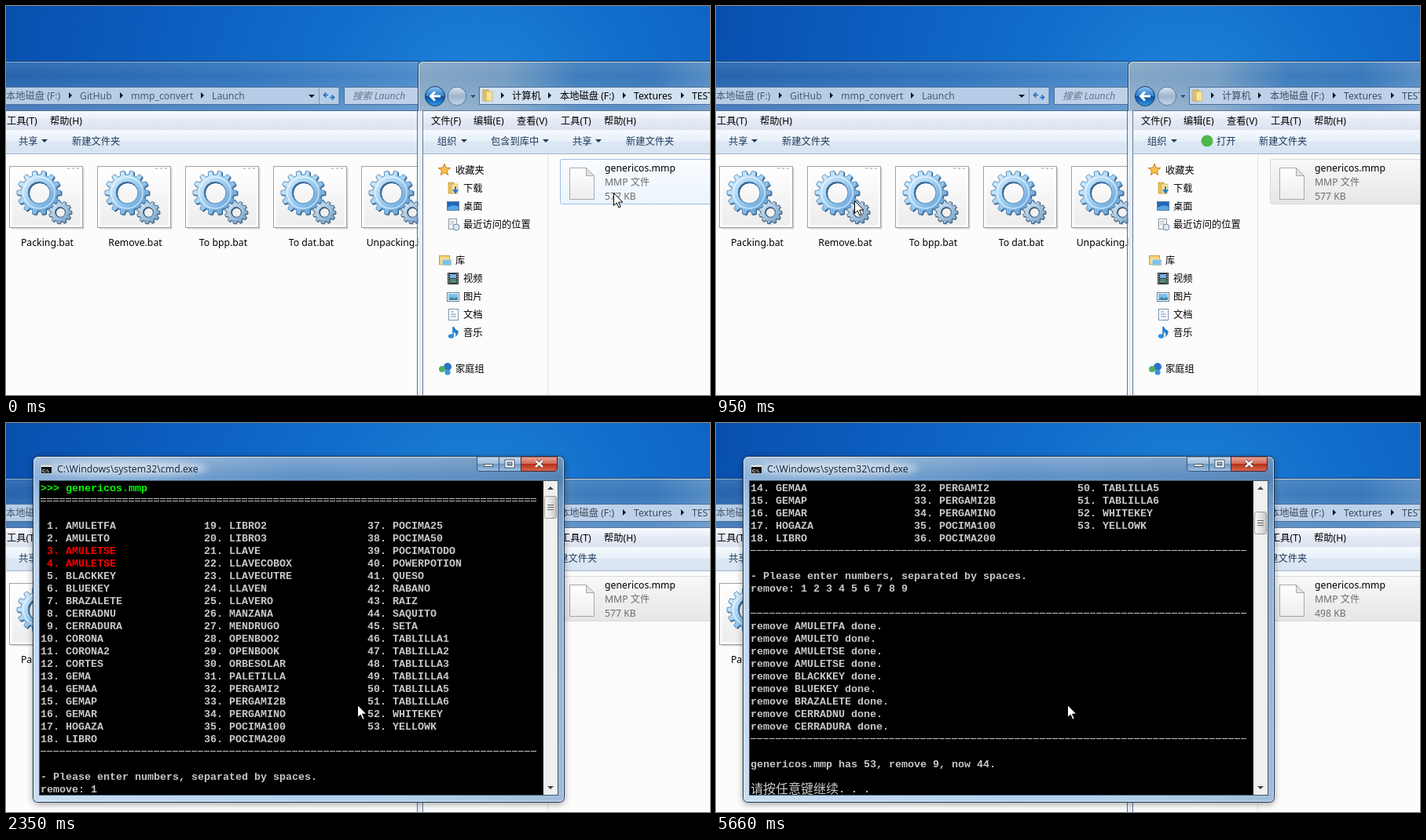
An HTML page that plays this animation: 896 px wide and 496 px high, repeating every 6660 ms.

```html
<!DOCTYPE html>
<html lang="zh-CN">
<head>
<meta charset="utf-8">
<title>Remove entries by drag and drop</title>
<style>
html, body { margin: 0; width: 100%; height: 100%; overflow: hidden; background: #0b57b5; }
svg { position: absolute; left: 0; top: 0; width: 896px; height: 496px; }
text { font: 12.25px "Noto Sans", "Noto Sans CJK SC", sans-serif; white-space: pre; }
.con text { font: bold 13.333px "Liberation Mono", "Noto Sans CJK SC", monospace; }
.con .wide { font: 16px "Noto Sans CJK SC", sans-serif; }
#shell { transform-origin: 372.5px 263px; }
</style>
</head>
<body>
<svg id="desk" viewBox="0 0 896 496"></svg>
<svg id="shell" viewBox="0 0 896 496"></svg>
<svg id="top" viewBox="0 0 896 496"></svg>
<script>
const $ = id => document.getElementById(id);
const show = (id, on) => $(id).setAttribute('visibility', on ? 'visible' : 'hidden');
const move = (id, x, y) => $(id).setAttribute('transform', `translate(${x} ${y})`);
const clamp = v => Math.min(1, Math.max(0, v));
const smooth = v => v * v * (3 - 2 * v);
const mix = (a, b, p) => a + (b - a) * p;

// y is the middle of the line of text
const text = (x, y, s, fill = '#000', attr = '') =>
  `<text x="${x}" y="${y + 4.5}" fill="${fill}" ${attr}>${s}</text>`;
const rect = (x, y, w, h, fill, attr = '') =>
  `<rect x="${x}" y="${y}" width="${w}" height="${h}" fill="${fill}" ${attr}/>`;
const path = (d, fill = 'none', attr = '') => `<path d="${d}" fill="${fill}" ${attr}/>`;
const disc = (x, y, r, fill, attr = '') => `<circle cx="${x}" cy="${y}" r="${r}" fill="${fill}" ${attr}/>`;
const right = (x, y = 114) => path(`M${x - 2} ${y - 4}l4 4-4 4z`, '#111');
const down = (x, y, fill = '#1e395b') => path(`M${x - 4} ${y - 2}h8l-4 4z`, fill);
const grad = (id, stops, dir = 'x2="0" y2="1"') =>
  `<linearGradient id="${id}" ${dir}>` + stops.map(([o, c, a = 1]) =>
    `<stop offset="${o}" stop-color="${c}" stop-opacity="${a}"/>`).join('') + '</linearGradient>';

function gear(cx, cy, r, teeth, hole, fill, line) {
  let d = '';
  for (let i = 0; i < teeth; i++) {
    [[-.32, .82], [-.2, 1], [.2, 1], [.32, .82]].forEach(([k, s]) => {
      const a = (i + k) * 2 * Math.PI / teeth;
      d += `${d ? 'L' : 'M'}${(cx + r * s * Math.cos(a)).toFixed(1)} ${(cy + r * s * Math.sin(a)).toFixed(1)}`;
    });
  }
  d += `zM${cx - hole} ${cy}a${hole} ${hole} 0 1 0 ${2 * hole} 0a${hole} ${hole} 0 1 0 ${-2 * hole} 0z`;
  return path(d, fill, `fill-rule="evenodd" stroke="${line}"`);
}

const sheet = (x, y, w, h, fold) =>
  path(`M${x} ${y}h${w - fold}l${fold} ${fold}v${h - fold}h${-w}z`, 'url(#paper)', 'stroke="#a9a9a9"') +
  path(`M${x + w - fold} ${y}v${fold}h${fold}z`, '#e4e4e4', 'stroke="#a9a9a9"');

const bats = ['Packing.bat', 'Remove.bat', 'To bpp.bat', 'To dat.bat', 'Unpacking.bat'];

function batIcon(name, i) {
  return `<g transform="translate(${112 * i} 0)">` +
    rect(6.5, 206.5, 93, 78, '#000', 'opacity=".15"') +
    rect(4.5, 204.5, 93, 78, 'url(#thumb)', 'stroke="#a2a2a2"') +
    rect(6.5, 206.5, 89, 74, 'none', 'stroke="#fff" stroke-width="2"') +
    path('M78 207h3M84 207h3M90 207h3', 'none', 'stroke="#999"') +
    gear(43, 239, 28, 14, 13.5, '#31597f', '#31597f') +
    gear(42, 238, 28, 14, 14, 'url(#gearA)', '#5d93c4') +
    disc(42, 238, 20, 'none', 'stroke="#fff" stroke-width="1.5" opacity=".6"') +
    gear(69.5, 263.5, 14.5, 11, 6, '#2f4d69', '#2f4d69') +
    gear(69, 263, 14.5, 11, 6.5, 'url(#gearB)', '#4f7598') +
    text(52.5, 301, name, '#000', 'text-anchor="middle"') + '</g>';
}

const defs = '<defs>' +
  `<radialGradient id="sky" gradientUnits="userSpaceOnUse" cx="600" cy="130" r="660">
    <stop offset="0" stop-color="#1f85da"/><stop offset=".3" stop-color="#126ecb"/>
    <stop offset=".65" stop-color="#0b5cbd"/><stop offset="1" stop-color="#084ca9"/></radialGradient>` +
  grad('glassL', [[0, '#1d5dab'], [.6, '#2a70bb'], [1, '#4486c8']], '') +
  grad('glassR', [[0, '#7fa3c4'], [.3, '#6f99c0'], [.55, '#3577ba'], [.8, '#2f72b8'], [1, '#4f88c2']], '') +
  grad('sheen', [[0, '#fff', .12], [.3, '#fff', .04], [1, '#fff', .22]]) +
  grad('menu', [[0, '#f8faff'], [.45, '#e6ebf6'], [1, '#dbe2f0']]) +
  grad('bar', [[0, '#f6fafe'], [.5, '#e6eff9'], [.51, '#dce7f4'], [1, '#d7e4f2']]) +
  grad('thumb', [[0, '#fff'], [1, '#ececec']]) +
  grad('paper', [[0, '#fff'], [1, '#ededed']]) +
  grad('gearA', [[0, '#e9f6fe'], [.45, '#a4d2f3'], [1, '#4b90d0']], 'x2="1" y2="1"') +
  grad('gearB', [[0, '#e3eef6'], [1, '#6b9bc4']], 'x2="1" y2="1"') +
  grad('hover', [[0, '#fafcff'], [1, '#ebf4fd']]) +
  grad('pick', [[0, '#e1effd'], [1, '#c4dffb']]) +
  grad('idle', [[0, '#f8f8f8'], [1, '#e6e6e6']]) +
  grad('ball', [[0, '#8fc4f2'], [.48, '#2f7fd0'], [.5, '#0b4a9c'], [1, '#2fa0ea']]) +
  grad('ballOff', [[0, '#dbe6f0'], [.5, '#9db6cd'], [1, '#c2d6e8']]) +
  '<clipPath id="leftClip"><rect width="525" height="496"/></clipPath></defs>';

const leftWindow = '<g clip-path="url(#leftClip)">' +
  rect(0, 70, 525, 64, 'url(#glassL)') + rect(0, 70, 525, 64, 'url(#sheen)') +
  path('M0 70.5h525', 'none', 'stroke="#183f70"') + path('M0 71.5h525', 'none', 'stroke="#86b0dc"') +
  rect(-2, 103.5, 426, 22, '#b6cde7', 'stroke="#4d7098"') +
  path('M398.5 104v21', 'none', 'stroke="#7d9bbd"') +
  rect(430.5, 103.5, 120, 22, '#bdd1e8', 'stroke="#4d7098"') +
  text(0, 114, '本地磁盘 (F:)', '#4b5a6b') + right(82) + text(94, 114, 'GitHub', '#4b5a6b') + right(147) +
  text(159, 114, 'mmp_convert', '#4b5a6b') + right(250) + text(262, 114, 'Launch', '#4b5a6b') +
  down(389, 115, '#111') +
  path('M405 113.500h5m-2.500-3l-3 3 3 3M412 116.500h5m-2.500-3l3 3-3 3', 'none', 'stroke="#1f6fc4" stroke-width="1.6"') +
  text(441, 114, '搜索 Launch', '#66778b', 'style="font-style:italic"') +
  path('M0 133.5h525', 'none', 'stroke="#4f6d8f"') +
  rect(0, 134, 525, 24, 'url(#menu)') + rect(0, 158, 525, 30, 'url(#bar)') +
  path('M0 188.5h525', 'none', 'stroke="#a6b6ca"') + rect(0, 189, 525, 307, '#fcfcfc') +
  text(1, 146, '工具(T)') + text(56, 146, '帮助(H)') +
  text(16, 172, '共享', '#1e395b') + down(49, 172) + text(84, 172, '新建文件夹', '#1e395b') +
  rect(0.5, 195.5, 104, 117, 'url(#pick)', 'id="target" rx="2" stroke="#86b3e2"') +
  bats.map(batIcon).join('') + '</g>';

const star = Array.from({ length: 10 }, (_, i) => {
  const a = i * Math.PI / 5 - Math.PI / 2, r = i % 2 ? 3.4 : 8;
  return `${558 + r * Math.cos(a)} ${209 + r * Math.sin(a)}`;
}).join('L');

const folder = (x, y) =>
  rect(x, y - 7, 7, 14, '#e8c25c', 'stroke="#b98f2a" stroke-width=".6"') +
  rect(x + 4, y - 5, 8, 12, '#f9e39c', 'stroke="#c39b3a" stroke-width=".6"');

const picture = (y, fill) => rect(561.5, y - 5.5, 15, 11, fill, 'stroke="#5f7f9f"');

const navIcons =
  path(`M${star}z`, '#f9c24c', 'stroke="#cf7a1e"') +
  folder(563, 232) + path('M572 230v7m-3-3l3 4 3-4', 'none', 'stroke="#1d78d6" stroke-width="2"') +
  picture(255, '#2167b8') + path('M562 257q7-5 14-1v4h-14z', '#58a4e4') +
  rect(563.5, 271.5, 10, 13, '#f5f5f5', 'stroke="#8d99a6"') +
  path('M565 275h6M565 278h5', 'none', 'stroke="#9aa"') + disc(573, 282, 4, '#dce9f5', 'stroke="#6b86a3"') +
  rect(551.5, 318.5, 13, 11, '#f5d67e', 'stroke="#c39b3a"') + rect(555, 323, 12, 8, '#7fc1ec', 'stroke="#f9e7ac"') +
  rect(562, 340, 14, 15, '#32393f') + rect(565, 342, 8, 5, '#74b2e6') + rect(565, 348, 8, 5, '#4c8f6a') +
  path('M563.5 341v13M574.5 341v13', 'none', 'stroke="#ddd" stroke-dasharray="1.5 1.5"') +
  picture(371, '#fff') + rect(563, 367, 12, 8, '#79bdec') + path('M563 375l4-4 3 2 5-2v4z', '#3f7f95') +
  rect(563.5, 386.5, 12, 14, '#fff', 'stroke="#7d92a9"') +
  path('M566 390h4M566 393h7M566 396h7', 'none', 'stroke="#5f8fc0"') +
  path('M569 421v-12q2 4 6 6q0 3-2 5q1-4-3-5', '#2a8fe0', 'stroke="#1b74c4" stroke-width="1.4"') +
  `<ellipse cx="566.5" cy="421" rx="3.6" ry="2.8" fill="#2a8fe0"/>` +
  disc(562, 460, 5, '#2d73c4') + disc(555, 463, 4, '#4fb06a') + disc(562, 467, 3.6, '#3b93d9');

const nav = [[572, 209, '收藏夹'], [582, 232, '下载'], [582, 255, '桌面'], [582, 278, '最近访问的位置'],
  [572, 324, '库'], [582, 347, '视频'], [582, 370, '图片'], [582, 393, '文档'], [582, 416, '音乐'], [572, 462, '家庭组']];

const rightWindow =
  path('M524.5 496V77q0-6.5 7-6.5H900V496z', '#e6eff9') +
  path('M525 134V77q0-6 7-6H896v63z', 'url(#glassR)') + path('M525 134V77q0-6 7-6H896v63z', 'url(#sheen)') +
  path('M524.5 134V77q0-6.5 7-6.5H900', 'none', 'stroke="#25405f"') +
  path('M523.5 500V134', 'none', 'stroke="#5f7085"') +
  path('M525.5 500V78q0-6.5 7-6.5H900', 'none', 'stroke="#e3eef8" stroke-opacity=".8"') +
  disc(546, 115, 12.5, 'url(#ball)', 'stroke="#153a6c"') +
  path('M553 115h-12m5-5.5l-5.500 5.500 5.500 5.500', 'none', 'stroke="#fff" stroke-width="3"') +
  disc(574, 115, 11.8, 'url(#ballOff)', 'stroke="#56779b"') +
  path('M590 113h9l-4.500 5z', '#1c4f86', 'stroke="#d5e6f6" stroke-width=".6"') +
  rect(602.5, 103.5, 300, 22, '#d2e1f2', 'id="address" stroke="#4d7098"') + folder(607, 114) +
  '<g id="crumbs">' + [[644, '计算机'], [705, '本地磁盘 (F:)'], [799, 'Textures'], [873, 'TEST']]
    .map(([x, s]) => text(x, 114, s, 'inherit')).join('') + '</g>' +
  [632, 692, 787, 861].map(x => right(x)).join('') +
  rect(531, 134, 365, 24, 'url(#menu)') + rect(531, 158, 365, 30, 'url(#bar)') +
  path('M531 188.5h365', 'none', 'stroke="#a6b6ca"') + rect(531, 189, 365, 307, '#fcfcfc') +
  path('M530.5 496V133.500H896', 'none', 'stroke="#66788e"') + path('M689.5 189v307', 'none', 'stroke="#dfe5ee"') +
  [[541, '文件(F)'], [595, '编辑(E)'], [650, '查看(V)'], [706, '工具(T)'], [761, '帮助(H)']]
    .map(([x, s]) => text(x, 146, s)).join('') +
  text(549, 172, '组织', '#1e395b') + down(583, 172) +
  '<g id="barPlain">' + text(617, 172, '包含到库中', '#1e395b') + down(687, 172) +
  text(721, 172, '共享', '#1e395b') + down(754, 172) + text(789, 172, '新建文件夹', '#1e395b') + '</g>' +
  '<g id="barPick">' + disc(625, 172, 7.500, '#4fb848') + text(637, 172, '打开', '#1e395b') +
  text(691, 172, '新建文件夹', '#1e395b') + '</g>' +
  navIcons + nav.map(([x, y, s]) => text(x, y, s)).join('') +
  rect(705.5, 195.5, 200, 57, 'url(#hover)', 'id="file" rx="2"') + sheet(717.5, 206.5, 31, 40, 10) +
  text(762, 206, 'genericos.mmp') + text(762, 224, 'MMP 文件', '#6d6d6d') +
  text(762, 242, '577 KB', '#6d6d6d', 'id="size"');

$('desk').innerHTML = defs + rect(0, 0, 896, 496, 'url(#sky)') + leftWindow + rightWindow;

const items = ('AMULETFA AMULETO AMULETSE AMULETSE BLACKKEY BLUEKEY BRAZALETE CERRADNU CERRADURA CORONA CORONA2 ' +
  'CORTES GEMA GEMAA GEMAP GEMAR HOGAZA LIBRO LIBRO2 LIBRO3 LLAVE LLAVECOBOX LLAVECUTRE LLAVEN LLAVERO MANZANA ' +
  'MENDRUGO OPENBOO2 OPENBOOK ORBESOLAR PALETILLA PERGAMI2 PERGAMI2B PERGAMINO POCIMA100 POCIMA200 POCIMA25 ' +
  'POCIMA50 POCIMATODO POWERPOTION QUESO RABANO RAIZ SAQUITO SETA TABLILLA1 TABLILLA2 TABLILLA3 TABLILLA4 ' +
  'TABLILLA5 TABLILLA6 WHITEKEY YELLOWK').split(' ');

const rowY = r => 83 + 16 * r;
const cell = (col, row, s, fill = '#c8c8c8', attr = '') => text(44 + 8 * col, rowY(row) - .5, s, fill, attr);
const rule = (row, dy = -.5) =>
  path(`M44 ${rowY(row) + dy}h632`, 'none', 'stroke="#c4c4c4" stroke-dasharray="7 1"');

const listing = cell(0, 0, '&gt;&gt;&gt; genericos.mmp', '#0f0') + rule(1, -2.500) + rule(1, .5) +
  items.map((s, i) => {
    const col = 26 * Math.floor(i / 18), row = 3 + i % 18, fill = i === 2 || i === 3 ? '#f00' : undefined;
    return cell(col + (i < 9 ? 1 : 0), row, `${i + 1}.`, fill) + cell(col + 4, row, s, fill);
  }).join('') + rule(21) + cell(0, 23, '- Please enter numbers, separated by spaces.') +
  cell(0, 24, 'remove:', undefined, 'id="prompt"') + rect(0, 472, 8, 2, '#c8c8c8', 'id="caret"');

const results = rule(26) + items.slice(0, 9).map((s, i) => cell(0, 27 + i, `remove ${s} done.`)).join('') +
  rule(36) + cell(0, 38, 'genericos.mmp has 53, remove 9, now 44.') +
  text(44, 723, '请按任意键继续', '#c8c8c8', 'class="wide"') + cell(14, 40, '. . .');

const frame = 'M34.5 477V50q0-7.500 7.500-7.500H703q7.500 0 7.500 7.500V477q0 6.500-6.500 6.500H41q-6.500 0-6.500-6.500z';

$('shell').innerHTML = '<defs>' +
  grad('frame', [[0, '#83a9d0'], [.06, '#5d90c6'], [.12, '#7ba7d5'], [.25, '#a5c5e6'], [1, '#b4d1ee']]) +
  grad('lit', [[0, '#fff', .3], [.5, '#fff', 0], [1, '#123', .12]], '') +
  grad('btn', [[0, '#c6d9ec'], [.48, '#9dbbd9'], [.5, '#6f98c2'], [1, '#9cc0e2']]) +
  grad('close', [[0, '#e8a898'], [.48, '#d26a55'], [.5, '#b42f1b'], [1, '#d9694a']]) +
  grad('thumbBar', [[0, '#f8f8f8'], [.5, '#e4e4e4'], [1, '#c6c6c6']], '') +
  `<filter id="glow" x="-20%" y="-100%" width="140%" height="300%"><feGaussianBlur stdDeviation="5"/></filter>
  <filter id="shade"><feDropShadow dx="0" dy="2" stdDeviation="4" flood-color="#001" flood-opacity=".4"/></filter>
  <clipPath id="page"><rect x="43" y="74" width="641" height="400"/></clipPath></defs>` +
  path(frame, 'url(#frame)', 'filter="url(#shade)"') + path(frame, 'url(#lit)', 'stroke="#1d3552"') +
  path('M35.500 477V50q0-6.500 6.500-6.500H703q6.500 0 6.500 6.500V477q0 5.500-5.500 5.500H41q-5.500 0-5.500-5.500z', 'none',
    'stroke="#e6f1fb" stroke-opacity=".75"') +
  '<ellipse cx="155" cy="58" rx="102" ry="9" fill="#fff" opacity=".6" filter="url(#glow)"/>' +
  rect(44.5, 53.5, 14, 11, '#111', 'stroke="#b8c4d0"') + rect(45, 54, 13, 2, '#dfe6ee') +
  '<text x="46" y="63" fill="#fff" style="font:bold 6px Liberation Sans,sans-serif">C:\\.</text>' +
  text(65, 58, 'C:\\Windows\\system32\\cmd.exe', '#1a2a3a') +
  path('M599.5 43v14q0 4.500 4.500 4.500H655.500V43z', 'url(#btn)', 'stroke="#37567a"') +
  path('M627.5 43v18', 'none', 'stroke="#37567a"') +
  path('M655.5 43v18.500H697q4.500 0 4.500-4.500V43z', 'url(#close)', 'stroke="#4a2430"') +
  rect(608.5, 52.5, 11, 3, '#fff', 'stroke="#46576b"') +
  rect(636.5, 48.5, 9, 7, 'none', 'stroke="#46576b" stroke-width="4"') +
  rect(636.5, 48.5, 9, 7, 'none', 'stroke="#fff" stroke-width="2"') +
  ['stroke="#5d3038" stroke-width="4"', 'stroke="#fff" stroke-width="2.400"']
    .map(s => path('M674 48l9 8m0-8l-9 8', 'none', s)).join('') +
  rect(42.5, 73.5, 660, 401, '#000', 'stroke="#3f566f"') +
  '<g class="con" clip-path="url(#page)"><g id="parse">' + cell(0, 0, 'Files pre-parsing...') + '</g>' +
  `<g id="body">${listing}<g id="results">${results}</g></g></g>` +
  rect(684, 74, 18, 400, '#f0f0f0') + rect(684, 74, 1, 400, '#fafafa') +
  path('M689 85l4-4 4 4z', '#444') + path('M689 463h8l-4 4z', '#444') +
  '<g id="slider">' + rect(685.5, 93.5, 15, 28, 'url(#thumbBar)', 'rx="2" stroke="#979797"') +
  path('M689 104.500h8M689 107.500h8M689 110.500h8', 'none', 'stroke="#666"') + '</g>';

$('top').innerHTML = '<g id="ghost">' +
  rect(.5, .5, 103, 104, '#e9f2fa', 'opacity=".5" stroke="#fff"') +
  `<g opacity=".75">${sheet(18.5, 9.5, 65, 83, 17)}</g></g>` +
  '<g id="tip">' + rect(.5, .5, 139, 18, '#fff', 'id="tipBox" rx="2.500" stroke="#767676"') +
  rect(4, 4, 11, 11, '#eaf3fc') + path('M9.500 4v11M4 9.500h11', 'none', 'stroke="#1656b0" stroke-width="3"') +
  text(20, 9, '', '#123a8c', 'id="tipText"') + '</g>' +
  path('M.5.5v16l3.700-3.500 2.600 6 2.400-1-2.600-5.900h5.200z', '#fff', 'id="mouse" stroke="#000"');

const keys = [2350, 2630, 2980, 3330, 3610, 3890, 4240, 4590, 4940];
const fileLook = { hover: '#9fc0e4', pick: '#84acdd', idle: '#d9d9d9' };
let lastTip = '';

function pointer(t) {
  if (t < 100) return [773, 238];
  if (t < 600) {
    const p = smooth(clamp((t - 50) / 550));
    return [mix(773, 146, p), mix(238, 248, p)];
  }
  if (t < 1450) return [mix(146, 176, smooth(clamp((t - 600) / 150))), 248];
  const p = smooth(clamp((t - 1450) / 300));
  return [mix(176, 447, p), mix(248, 359, p)];
}

function drawDrag(t, x, y) {
  const dragging = t >= 100 && t < 800;
  const over = Math.floor(x / 112);
  const hit = dragging && x < 524 && x % 112 < 105;
  show('ghost', dragging);
  move('ghost', x - 51, y - 92);
  show('target', hit);
  show('tip', hit);
  if (!hit) return;
  move('target', 112 * over, 0);
  move('tip', x + 11, y + 14);
  if (lastTip !== bats[over]) {
    lastTip = bats[over];
    $('tipText').textContent = `用 ${lastTip} 打开`;
    $('tipBox').setAttribute('width', Math.round($('tipText').getComputedTextLength()) + 26);
  }
}

function drawShell(t, q) {
  const u = clamp((q - 950) / 200), left = (1 - u) ** 1.36;
  const open = q > 950, listed = t >= 1200, done = t >= 5610;
  const shell = $('shell').style;
  shell.visibility = open ? 'visible' : 'hidden';
  shell.opacity = 1 - left;
  shell.transform = left ? `translateY(${-7 * left}px) perspective(1500px) rotateX(${-18 * left}deg) scale(${1 - .11 * left})` : 'none';
  $('parse').style.display = listed ? 'none' : '';
  $('body').style.display = listed ? '' : 'none';
  $('results').style.display = done ? '' : 'none';
  move('body', 0, done ? -256 : 0);
  move('slider', 0, done ? 20 : 0);

  const typed = keys.filter(k => t >= k).length;
  $('prompt').textContent = 'remove:' + keys.slice(0, typed).map((_, i) => ` ${i + 1}`).join('');
  $('caret').setAttribute('x', 108 + 16 * typed);
  $('caret').style.display = t > 1040 && !done && Math.floor((t - 1040) / 530) % 2 ? '' : 'none';
}

function draw(t) {
  const q = Math.floor(t / 50) * 50;
  const [x, y] = pointer(q);
  const picked = t >= 100, inactive = t >= 950;
  move('mouse', x, y);
  drawDrag(t, x, y);
  drawShell(t, q);
  show('barPlain', !picked);
  show('barPick', picked);
  const look = !picked ? 'hover' : inactive ? 'idle' : 'pick';
  $('file').setAttribute('fill', `url(#${look})`);
  $('file').setAttribute('stroke', fileLook[look]);
  $('address').setAttribute('fill', inactive ? '#bdd2ea' : '#d2e1f2');
  $('crumbs').setAttribute('fill', inactive ? '#3f4c5b' : '#000');
  $('size').textContent = t >= 5660 ? '498 KB' : '577 KB';
}

const start = performance.now();
function tick() {
  draw((performance.now() - start) % 6660);
  requestAnimationFrame(tick);
}
tick();
</script>
</body>
</html>
```
